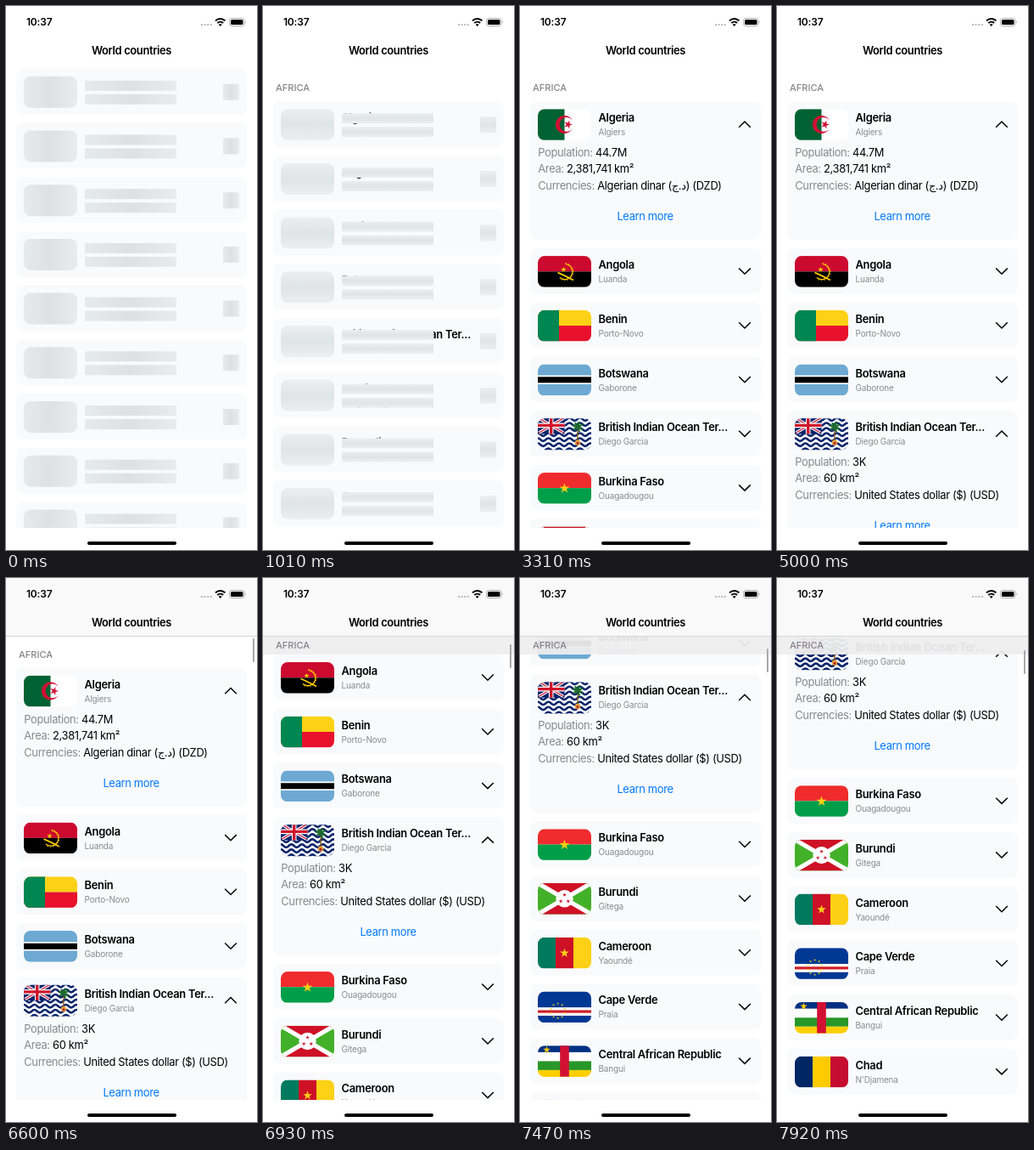
Write an HTML page that moves like this. It is 296 px wide and 640 px high and loops after 8000 ms.

```html
<!DOCTYPE html>
<html lang="en">
<head>
<meta charset="utf-8">
<title>World countries</title>
<style>
html, body { margin: 0; width: 100%; height: 100%; overflow: hidden; background: #fff; }
body { position: relative; font: 400 12.9px/16px Inter, "DejaVu Sans", sans-serif; letter-spacing: -.34px; color: #000; white-space: nowrap; }
body * { position: absolute; }
span, bdi, svg * { position: static !important; }
#list { inset: 0 0 auto; height: 614px; overflow: hidden; }
.card { left: 12px; top: 0; width: 272px; border-radius: 8px; background: #f9fafb; overflow: hidden; }
.flag { left: 9px; top: 9px; width: 63px; height: 36.5px; border-radius: 8px; }
.name { left: 80.5px; top: 12px; font-weight: 600; letter-spacing: -.28px; }
.capital { left: 80.5px; top: 28px; font-size: 10px; letter-spacing: -.18px; color: #8b8b8e; }
.chevron { left: 245px; top: 22px; width: 16px; height: 10px; }
.row { left: 9.3px; }
.row span { color: #88888b; }
.link { top: 127.5px; width: 271px; text-align: center; color: #007aff; }
.bone { background: var(--shine); }
.loading .flag, .loading .chevron, .empty .name, .empty .capital { visibility: hidden; }
#list:not(.loading) .bone { display: none; }
#section { left: 0; width: 281px; padding-left: 15px; height: 21px; font: 500 11px/21px Inter, sans-serif; letter-spacing: 0; color: #858588; }
#section.stuck { background: rgba(239, 239, 240, .94); }
#nav { left: 0; top: 0; width: 100%; height: 69px; border-bottom: 1px solid transparent; box-sizing: border-box; }
#nav.raised { background: #f9f9f9; border-color: #d6d6d7; }
#title { top: 45px; width: 100%; text-align: center; font-weight: 600; }
#clock { left: 24px; top: 11px; font-weight: 600; font-size: 12px; letter-spacing: -.2px; }
#status { left: 228px; top: 12px; }
#bar { left: 291px; width: 2.4px; height: 28px; border-radius: 2px; background: #a9a9ab; }
#home { left: 95.5px; top: 630px; width: 105.5px; height: 4px; border-radius: 2px; background: #000; }
</style>
</head>
<body>
<div id="list"></div>
<div id="section">AFRICA</div>
<div id="nav">
  <div id="clock">10:37</div>
  <svg id="status" width="58" height="14">
    <path d="M2 10h13" stroke="#b9b9bb" stroke-width="2" stroke-dasharray="2 1.6"/>
    <path d="M19 5.4a8.2 8.2 0 0 1 11.4 0M21.3 8a5 5 0 0 1 6.8 0" fill="none" stroke="#000" stroke-width="2"/>
    <path d="M24.7 12l-2-2.2a3 3 0 0 1 4 0z"/>
    <rect x="35.5" y="2.5" width="17.5" height="9" rx="2.7" fill="none" stroke="#a5a5a7" stroke-width=".9"/>
    <rect x="37" y="4" width="14.5" height="6" rx="1.5"/>
    <path d="M54 5.5q1.6 1.5 0 3z" fill="#a5a5a7"/>
  </svg>
  <div id="title">World countries</div>
</div>
<div id="bar"></div>
<div id="home"></div>
<script>
const W = 63, H = 36.5, PITCH = 63.7, CARD = 53.7, GROWTH = 109.2, LOOP = 8000;
const $ = id => document.getElementById(id);

const rect = (x, y, w, h, c) => `<rect x="${x}" y="${y}" width="${w}" height="${h}" fill="${c}"/>`;
const path = (d, c, more = '') => `<path d="${d}" fill="${c}" ${more}/>`;
const line = (d, c, w, more = '') => path(d, 'none', `stroke="${c}" stroke-width="${w}" ${more}`);
const circle = (x, y, r, c) => `<circle cx="${x}" cy="${y}" r="${r}" fill="${c}"/>`;
const star = (x, y, r, c) => {
  const points = Array.from({ length: 10 }, (_, i) => {
    const a = i * Math.PI / 5, q = i % 2 ? r * .382 : r;
    return [x + q * Math.sin(a), y - q * Math.cos(a)].map(v => v.toFixed(2));
  });
  return `<polygon points="${points.join(' ')}" fill="${c}"/>`;
};
const ring = (n, x, y, r, draw) => Array.from({ length: n }, (_, i) => {
  const a = i * 2 * Math.PI / n;
  return draw(x + r * Math.sin(a), y - r * Math.cos(a));
}).join('');
const bands = (...colors) => colors.map((c, i) => rect(i * W / 3, 0, W / 3 + .1, H, c)).join('');
const halves = (top, bottom, x = 0) => rect(x, 0, W, H / 2, top) + rect(x, H / 2, W, H / 2, bottom);
const waves = Array.from({ length: 7 }, (_, i) =>
  line(`M-3 ${i * 6 + 1}q3.1 -3.4 6.2 0${'t6.2 0'.repeat(11)}`, '#08246b', 2.7)).join('');
const jack = rect(0, 0, 31.5, 18.3, '#08246b') +
  line('M1.5 0L30 16.8M30 0L1.5 16.8', '#fff', 3.6) +
  line('M1.5 0L30 16.8M30 0L1.5 16.8', '#cf142b', 1.3) +
  line('M15.7 0V18.3M0 8.2H31.5', '#fff', 5.6) + line('M15.7 0V18.3M0 8.2H31.5', '#cf142b', 3.4);
const palm = line('M47.5 11Q46 19 47.5 28', '#8a5a1c', 1.4) +
  line('M47 10L41 8M47 10L42 13M47 10L44 5M47 10L49 4M47 10L53 7M47 10L53 13M47 10L49 16', '#1c6b2a', 2.2) +
  circle(47, 28.5, 3.2, '#e8a33a') + circle(47, 29, 1.5, '#b3222e');

const countries = [
  ['Algeria', 'Algiers', rect(0, 0, W, H, '#fff') + rect(0, 0, W / 2, H, '#006233') +
    path('M579.9 225a150 150 0 1 0 0 150a120 120 0 1 1 0-150zM585.7 300L450 344.1L533.9 228.6V371.4L450 255.9z',
      '#d21034', 'transform="translate(0 -2.75) scale(.07)"')],
  ['Angola', 'Luanda', halves('#cc092f', '#000') +
    line('M32.5 9.6A9 9 0 1 1 26 25.4', '#ffcb00', 1.3) +
    line('M32.5 8.5A10.1 10.1 0 1 1 25.5 26.4', '#ffcb00', 1, 'stroke-dasharray="1.4 2"') +
    line('M23.5 19.5Q30 22 42 28.5', '#ffcb00', 1.7) + star(30.5, 16, 3.4, '#ffcb00')],
  ['Benin', 'Porto-Novo', halves('#fcd116', '#e8112d') + rect(0, 0, 25, H, '#008751')],
  ['Botswana', 'Gaborone', rect(0, 0, W, H, '#6da9d2') + rect(0, 13, W, 10.5, '#fff') + rect(0, 14.8, W, 7, '#000')],
  ['British Indian Ocean Ter...', 'Diego Garcia', rect(0, 0, W, H, '#fff') + waves + jack + palm],
  ['Burkina Faso', 'Ouagadougou', halves('#ef2b2d', '#009e49') + star(W / 2, 18.6, 6.2, '#fcd116')],
  ['Burundi', 'Gitega', rect(0, 0, W, H, '#43b02a') + path(`M0 0H${W}L0 ${H}H${W}z`, '#ce1126') +
    line(`M0 0L${W} ${H}M${W} 0L0 ${H}`, '#fff', 5.2) + circle(W / 2, H / 2, 10.2, '#fff') +
    ring(3, W / 2, 18.8, 5, (x, y) => star(x, y, 2.5, '#ce1126'))],
  ['Cameroon', 'Yaoundé', bands('#007a5e', '#ce1126', '#fcd116') + star(W / 2, 18.5, 5.6, '#fcd116')],
  ['Cape Verde', 'Praia', rect(0, 0, W, H, '#003893') + rect(0, 18.7, W, 9.8, '#fff') +
    rect(0, 22, W, 3.2, '#cf2027') + ring(10, 23.6, 22.8, 8.6, (x, y) => star(x, y, 1.6, '#f7d116'))],
  ['Central African Republic', 'Bangui', rect(0, 0, W, 7.8, '#003082') + rect(0, 7.8, W, 10.5, '#fff') +
    rect(0, 18.3, W, 10.5, '#289728') + rect(0, 28.8, W, 8, '#ffce00') +
    rect(26.2, 0, 10.6, H, '#d21034') + star(10.5, 5, 4.4, '#ffce00')],
  ['Chad', "N'Djamena", bands('#002664', '#fecb00', '#c60c30')],
];

const facts = {
  0: ['44.7M', '2,381,741 km²', 'Algerian dinar (<bdi>د.ج</bdi>) (DZD)'],
  4: ['3K', '60 km²', 'United States dollar ($) (USD)'],
};
const opens = { 0: [2850, 3310], 4: [4580, 5000] };

const bone = (x, y, w, h, r = 0) =>
  `<div class="bone" style="left:${x}px;top:${y}px;width:${w}px;height:${h}px;border-radius:${r}px"></div>`;
const bones = bone(9, 9, W, H, 8) + bone(80.5, 13.6, 108.5, 12) + bone(80.5, 30.4, 108.5, 11.8) + bone(244, 18.3, 18.5, 18.5, 1);
const details = values => ['Population', 'Area', 'Currencies'].map((label, i) =>
  `<div class="row" style="top:${52.5 + 19.75 * i}px"><span>${label}:</span> ${values[i]}</div>`).join('') +
  '<div class="link">Learn more</div>';

$('list').innerHTML = countries.map(([name, capital, flag], i) => `<div class="card">
  <svg class="flag" viewBox="0 0 ${W} ${H}">${flag}</svg>
  <div class="name">${name}</div><div class="capital">${capital}</div>
  <svg class="chevron">${line('M1.2 1.5L8 8.2L14.8 1.5', '#000', 1.5)}</svg>
  ${facts[i] ? details(facts[i]) : ''}${bones}</div>`).join('');
const cards = [...document.querySelectorAll('.card')];

// The screen refreshes in short bursts: [start, end, number of steps]
const times = [[0], [220], [440, 550, 2], [1010], [2850, 3310, 5], [4580, 5000, 5], [6600, 7370, 8], [7470, 7920, 5]]
  .flatMap(([a, b, n = 1]) => Array.from({ length: n }, (_, i) => n > 1 ? a + (b - a) * i / (n - 1) : a));

const ease = p => p * p * (3 - 2 * p);
const progress = (t, [a, b]) => ease(Math.min(1, Math.max(0, (t - a) / (b - a))));

// Finger drag, then a release with exponential slowdown
function scrollAt(t) {
  if (t < 6600) return 0;
  if (t < 6850) return 6.5 + (t - 6600) * .578;
  return 449 - 298 * Math.exp(-(t - 6850) / 500);
}

function draw(t) {
  const list = $('list'), empty = t < 1010, offset = scrollAt(t), moving = t >= 6600;
  list.classList.toggle('empty', empty);
  list.classList.toggle('loading', t < 2850);
  list.style.setProperty('--shine', empty
    ? `linear-gradient(90deg, #e5eaec, #dde1e3 ${50 + t / 22}%, #e9ecee)`
    : 'linear-gradient(#eceff0, #dfe4e6 50%, #eceff0)');

  let y = (empty ? 73.8 : 112.2) - offset;
  cards.forEach((card, i) => {
    const grown = opens[i] ? GROWTH * progress(t, opens[i]) : 0;
    const up = opens[i] && t >= opens[i][0];
    card.style.transform = `translateY(${y}px)`;
    card.style.height = CARD + grown + 'px';
    card.querySelector('.chevron').style.transform = up ? 'scaleY(-1)' : '';
    y += PITCH + grown;
  });

  $('section').hidden = empty;
  $('section').style.top = Math.max(69, 86 - offset) + 'px';
  $('section').classList.toggle('stuck', offset > 17);
  $('nav').classList.toggle('raised', moving);
  $('bar').hidden = !moving;
  $('bar').style.top = 71 + offset * .034 + 'px';
}

function tick(now) {
  const t = now % LOOP;
  draw(times.filter(x => x <= t).pop());
  requestAnimationFrame(tick);
}
draw(0);
requestAnimationFrame(tick);
</script>
</body>
</html>
```
